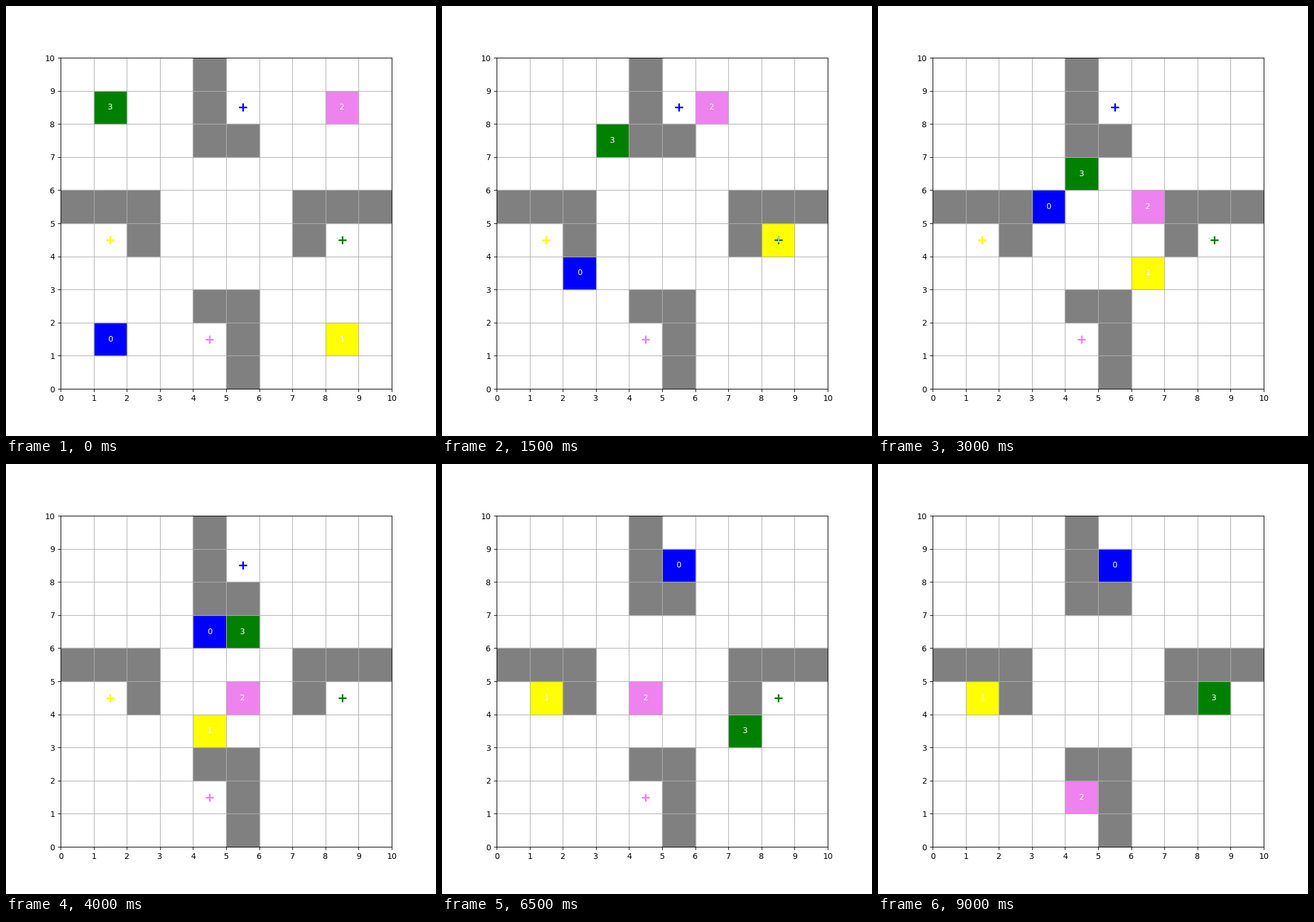
Write a matplotlib script that moves like this. It is 748 px wide and 748 px high and loops after 10000 ms.

```python
import matplotlib.pyplot as plt
from matplotlib.animation import FuncAnimation
from matplotlib.patches import Rectangle

SIZE, DPI = 748, 100
STEP_MS, STEPS = 500, 20
MOVES = {"U": (0, 1), "D": (0, -1), "L": (-1, 0), "R": (1, 0), ".": (0, 0)}

# colour, start cell, goal cell, one move per step
AGENTS = [
    ("blue", (1, 1), (5, 8), "UURRUUURRRUULRL"),
    ("yellow", (8, 1), (1, 4), "UUUDLLLLLLLU....LR"),
    ("violet", (8, 8), (4, 1), "L.LDDDLDL..RLLDDDR"),
    ("green", (1, 8), (8, 4), "DRRDR..RRDDDRRU"),
]
WALLS = [(4, 9), (4, 8), (4, 7), (5, 7),
         (0, 5), (1, 5), (2, 5), (2, 4),
         (7, 5), (8, 5), (9, 5), (7, 4),
         (4, 2), (5, 2), (5, 1), (5, 0)]


def walk(start, moves):
    """Cell of an agent at every step; it rests once its moves run out."""
    x, y = start
    cells = [start]
    for move in moves.ljust(STEPS - 1, "."):
        dx, dy = MOVES[move]
        x, y = x + dx, y + dy
        cells.append((x, y))
    return cells


fig = plt.figure(figsize=(SIZE / DPI, SIZE / DPI), dpi=DPI, facecolor="white")
ax = fig.add_axes([95 / SIZE, 82 / SIZE, 576 / SIZE, 576 / SIZE])
ax.set(xlim=(0, 10), ylim=(0, 10), xticks=range(11), yticks=range(11))
ax.grid(True)

paths, boxes, labels = [], [], []
for i, (color, start, goal, moves) in enumerate(AGENTS):
    paths.append(walk(start, moves))
    boxes.append(ax.add_patch(Rectangle(start, 1, 1, color=color)))
    labels.append(ax.text(start[0] + 0.5, start[1] + 0.5, str(i),
                          color="white", ha="center", va="center"))
    ax.plot(goal[0] + 0.5, goal[1] + 0.5, "+", color=color, ms=10, mew=2)

for cell in WALLS:
    ax.add_patch(Rectangle(cell, 1, 1, color="gray"))


def update(step):
    for path, box, label in zip(paths, boxes, labels):
        x, y = path[step]
        box.set_xy((x, y))
        label.set_position((x + 0.5, y + 0.5))
    return boxes + labels


anim = FuncAnimation(fig, update, frames=STEPS, interval=STEP_MS,
                     init_func=lambda: update(0), repeat=True, repeat_delay=0)
plt.show()
```
